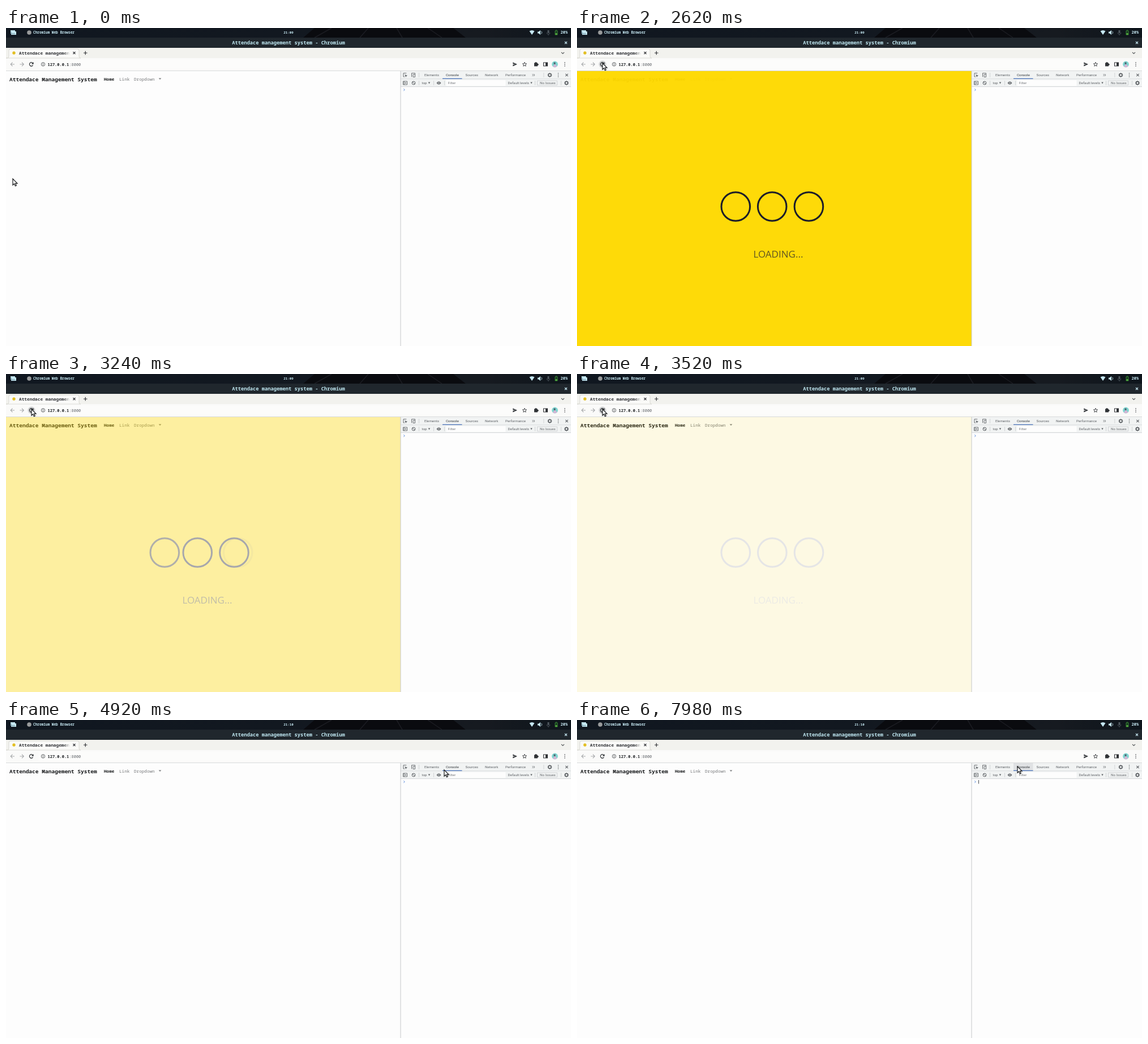
An HTML page with a canvas that plays this animation: 998x561 px, repeating every 8 s.

```html
<!DOCTYPE html>
<html lang="en">
<head>
<meta charset="utf-8">
<title>Attendace management system</title>
<style>
  html, body { margin: 0; width: 100%; height: 100%; overflow: hidden; background: #fdfdfd; }
  canvas { display: block; }
</style>
</head>
<body>
<canvas id="stage" width="998" height="561"></canvas>
<script>
const W = 998, H = 561, LOOP = 8000, SPLIT = 697;
const MONO = '"Noto Sans Mono", "DejaVu Sans Mono", monospace';
const SANS = 'Roboto, "Open Sans", sans-serif';
const ctx = document.getElementById('stage').getContext('2d');

const layer = document.createElement('canvas');
layer.width = SPLIT;
layer.height = H - 76;
const lctx = layer.getContext('2d');

// time, x, y of the pointer tip
const PATH = [
  [0, 12, 266], [250, 12, 266], [820, 27, 192], [1600, 45, 62],
  [4180, 45, 62], [4860, 774, 88], [5200, 774, 88], [5700, 776, 97],
  [6300, 777, 101], [6900, 778, 82], [8000, 778, 82]
];

const clamp = v => Math.max(0, Math.min(1, v));
const mix = (a, b, k) => a + (b - a) * k;
const smooth = k => k * k * (3 - 2 * k);
const between = (t, a, b) => t >= a && t < b;

// cubic-bezier(.25, .1, .25, 1)
function ease(x) {
  const curve = (a, b, s) => 3 * a * s * (1 - s) ** 2 + 3 * b * s * s * (1 - s) + s ** 3;
  let lo = 0, hi = 1;
  for (let i = 0; i < 24; i++) {
    const mid = (lo + hi) / 2;
    if (curve(.25, .25, mid) < x) lo = mid; else hi = mid;
  }
  return curve(.1, 1, lo);
}

function pointerAt(t) {
  const i = PATH.findIndex(p => p[0] > t);
  const [t0, x0, y0] = PATH[i - 1], [t1, x1, y1] = PATH[i];
  const k = smooth((t - t0) / (t1 - t0));
  return [mix(x0, x1, k), mix(y0, y1, k)];
}

function rect(x, y, w, h, color) {
  ctx.fillStyle = color;
  ctx.fillRect(x, y, w, h);
}

function text(s, x, y, size, color, family = MONO, weight = 400, align = 'left') {
  ctx.font = `${weight} ${size}px ${family}`;
  ctx.fillStyle = color;
  ctx.textAlign = align;
  ctx.fillText(s, x, y);
}

function dot(x, y, r, color) {
  ctx.fillStyle = color;
  ctx.beginPath();
  ctx.arc(x, y, r, 0, 7);
  ctx.fill();
}

function ring(x, y, r, color, width = 1, from = 0, to = 2 * Math.PI) {
  ctx.strokeStyle = color;
  ctx.lineWidth = width;
  ctx.beginPath();
  ctx.arc(x, y, r, from, to);
  ctx.stroke();
}

function shape(d, x, y, fill, stroke, width = 1) {
  const p = new Path2D(d);
  ctx.save();
  ctx.translate(x, y);
  if (fill) { ctx.fillStyle = fill; ctx.fill(p); }
  if (stroke) {
    ctx.strokeStyle = stroke;
    ctx.lineWidth = width;
    ctx.stroke(p);
  }
  ctx.restore();
}

function cross(x, y, r, color) {
  shape(`M${-r} ${-r}L${r} ${r}M${r} ${-r}L${-r} ${r}`, x, y, null, color, 1.1);
}

function kebab(x, y, color) {
  for (const d of [-3, 0, 3]) dot(x, y + d, .8, color);
}

function gear(x, y, color) {
  ring(x, y, 2.4, color, 1.5);
  for (let i = 0; i < 8; i++) {
    const a = i * Math.PI / 4;
    dot(x + 3.3 * Math.cos(a), y + 3.3 * Math.sin(a), .75, color);
  }
}

function drawSystemBar(t) {
  const sky = ctx.createLinearGradient(0, 0, W, 0);
  sky.addColorStop(0, '#101720');
  sky.addColorStop(.5, '#121820');
  sky.addColorStop(.85, '#161a20');
  sky.addColorStop(1, '#0e151c');
  rect(0, 0, W, 17, sky);
  shape('M545 0H790L812 17H525Z', 0, 0, '#0a0b0f');
  shape('M575 0L545 17M640 0L625 17M690 0L700 17M745 0L770 17', 0, 0, null, '#1b1c22', 1.5);

  const ink = '#c6e8f2';
  shape('M0 0H8V2H10V8H1V6H0Z', 8, 4, ink);
  shape('M1 2V6H8', 8, 4, null, '#4b7183', .8);
  dot(41, 8, 3.8, '#9a9c9d');
  text('Chromium Web Browser', 48, 10.2, 6.08, ink, MONO, 700);
  text(t < 4300 ? '21:09' : '21:10', 499, 10.2, 5.8, ink, MONO, 700, 'center');
  shape('M-4.5 -2.5Q0 -5.5 4.5 -2.5L0 4Z', 929, 8, ink);
  shape('M-4 -1.5H-2L1 -4V4L-2 1.5H-4Z', 943, 8, ink);
  ring(943.5, 8, 3, ink, .9, -1, 1);
  rect(956.5, 4, 3, 5, '#4e575e');
  ring(958, 8, 3, '#4e575e', .8, 0, Math.PI);
  rect(957.5, 11, 1, 2, '#4e575e');
  shape('M-2 -3H-1V-4H1V-3H2V4H-2Z', 972, 8, '#173a1e', '#3f9a3a', .8);
  rect(970.5, 9.5, 3, 2, '#6bd04a');
  text('20%', 979.5, 10.3, 7, ink, MONO, 700);

  rect(0, 17, W, 18, '#20272d');
  text('Attendace management system - Chromium', 499, 29, 8.75, '#bfe7f1', MONO, 700, 'center');
  cross(989, 26, 2, ink);
}

function drawTabs(t) {
  rect(0, 35, W, 18, '#f2f2ee');
  shape('M0 53H2Q5 53 5 50V40Q5 37 8 37H126Q129 37 129 40V50Q129 53 132 53Z', 0, 0, '#fafaf8', '#d3d3cd', .8);
  const loading = between(t, 1850, 2420);
  dot(14, 44, loading ? 1.4 : 2.7, '#e3bf23');
  text('Attendace managemen', 23, 46.7, 7.8, '#303236', MONO, 600);
  const fade = ctx.createLinearGradient(102, 0, 113, 0);
  fade.addColorStop(0, 'rgba(250,250,248,0)');
  fade.addColorStop(1, '#fafaf8');
  rect(102, 38, 11, 13, fade);
  cross(120.5, 44, 2, '#303236');
  shape('M-3.3 0H3.3M0 -3.3V3.3', 140.3, 44, null, '#303236', 1.2);
  shape('M-2.5 -1.2L0 1.3L2.5 -1.2', 983.5, 44, null, '#44474a', 1.1);
}

function drawToolbar(overReload) {
  rect(0, 53, W, 23, '#fafaf9');
  rect(0, 75, W, 1, '#d9dadb');
  const arrow = 'M3.5 0H-3M0 -3.3L-3.3 0L0 3.3';
  shape(arrow, 11.5, 64, null, '#a6a8aa', 1.1);
  ctx.save();
  ctx.translate(28, 64);
  ctx.scale(-1, 1);
  shape(arrow, 0, 0, null, '#a6a8aa', 1.1);
  ctx.restore();
  if (overReload) dot(45, 64, 6.5, '#d2d3d4');
  const ink = '#303336';
  ring(44.7, 64, 3.2, ink, 1.3, .5, 5.5);
  shape('M0 -3.8V0H-3.8Z', 48.7, 63.7, ink);

  rect(57, 56, 866, 16, '#fcfcfb');
  ring(65.5, 64, 3.2, '#505356', .9);
  rect(65, 63.4, 1, 2.4, '#505356');
  rect(65, 61.8, 1, 1, '#505356');
  text('127.0.0.1', 73.5, 66.6, 7, '#202326', MONO, 600);
  text(':8000', 111.3, 66.6, 7, '#65696d');
  shape('M-3.7 -3.4L4 0L-3.7 3.4V.8L1 0L-3.7 -.8Z', 899, 64, ink);
  let star = '';
  for (let i = 0; i < 10; i++) {
    const a = i * Math.PI / 5 - Math.PI / 2, r = i % 2 ? 1.7 : 3.8;
    star += (i ? 'L' : 'M') + r * Math.cos(a) + ' ' + r * Math.sin(a);
  }
  shape(star + 'Z', 916, 64.2, null, ink, .9);
  rect(933, 61.5, 6, 6, ink);
  dot(936, 61.5, 1.5, ink);
  dot(939.3, 64.5, 1.4, ink);
  shape('M-3.5 -3H3.5V3H-3.5Z', 953, 64, null, ink, 1.1);
  rect(953, 61, 3.5, 6, ink);
  dot(969.5, 64, 5.4, '#7fd5d0');
  shape('M-3.6 4A5.4 5.4 0 0 0 4 3.6L0 -1Z', 969.5, 64, '#d3b5d4');
  rect(967.5, 60.5, 3, 3.5, '#4c6670');
  kebab(987, 64, ink);
}

function drawPage() {
  rect(0, 76, W, H - 76, '#fdfdfd');
  text('Attendace Management System', 6, 94, 9.56, '#181a1c', MONO, 700);
  text('Home', 173, 93, 7.65, '#1d1f21', MONO, 700);
  text('Link', 200, 93, 7.65, '#77797b', MONO, 500);
  text('Dropdown', 226, 93, 7.65, '#77797b', MONO, 500);
  shape('M-2.4 -1H2.4L0 1.4Z', 272, 89.5, '#77797b');
}

function drawLoader(t) {
  if (!between(t, 2320, 3790)) return;
  const fade = .5 + Math.cos(Math.PI * clamp((t - 2460) / 1330)) / 2;
  const phase = ((t - 2699) / 880 + 1) % 1, k = ease(phase);
  const c = lctx;
  c.globalAlpha = 1;
  c.fillStyle = '#ffd900';
  c.fillRect(0, 0, SPLIT, H);
  c.strokeStyle = '#141523';
  c.lineWidth = 3;
  const step = 64.7;
  const circles = [[0, k], [k, 1], [1 + k, 1], [2, 1 - k]];
  for (const [slot, alpha] of circles) {
    c.globalAlpha = alpha;
    c.beginPath();
    c.arc(280.3 + slot * step, 239, 25.3, 0, 7);
    c.stroke();
  }
  c.globalAlpha = .7;
  c.fillStyle = '#141523';
  c.font = 'extra-condensed 17px "Open Sans", Roboto, sans-serif';
  c.textAlign = 'center';
  c.fillText('LOADING...', 355.5, 329);
  ctx.globalAlpha = fade;
  ctx.drawImage(layer, 0, 76);
  ctx.globalAlpha = 1;
}

function drawDevtools(t, overConsole) {
  const ink = '#5d6165', label = (s, x, y, color = ink) => text(s, x, y, 6.25, color, SANS);
  rect(SPLIT, 76, W - SPLIT, H - 76, '#fdfdfd');
  rect(SPLIT, 76, W - SPLIT, 28, '#f1f3f3');
  rect(SPLIT, 89.5, W - SPLIT, .7, '#d0d3d6');
  rect(SPLIT, 103, W - SPLIT, .8, '#d0d3d6');
  rect(SPLIT - .5, 76, 1, H - 76, '#c6c8ca');

  shape('M2 -3.3H-3.3V3H-1', 705.3, 83, null, ink, .9);
  shape('M-1 -1L4 1L1.8 1.8L1 4Z', 705.3, 83, ink);
  shape('M-2.5 3.3V-3.3H3.5V-1M0 -1H3.5V3.5H0Z', 719, 83, null, ink, .9);
  rect(729, 79, .8, 8, '#cbcdcf');
  if (overConsole) rect(771, 76, 34.5, 13, '#dfe1e3');
  label('Elements', 739, 85);
  label('Console', 777, 85, '#303438');
  label('Sources', 811.5, 85);
  label('Network', 846, 85);
  label('Performance', 882, 85);
  rect(771, 88.7, 34.5, 1.2, '#3f6bb5');
  shape('M-2 -2L0 0L-2 2M.5 -2L2.5 0L.5 2', 931.5, 83, null, ink, .8);
  rect(949.5, 79, .8, 8, '#cbcdcf');
  gear(960.5, 83, ink);
  kebab(975.5, 83, ink);
  cross(990.5, 83, 2.2, ink);

  shape('M-3.5 -3H3.5V3H-3.5ZM-1.7 -3V3', 705, 97, null, ink, .9);
  shape('M0 -1.5L2.3 0L0 1.5Z', 705, 97, ink);
  ring(720, 97, 2.9, ink, 1);
  shape('M-2 -2L2 2', 720, 97, null, ink, 1);
  rect(729, 93, .8, 8, '#cbcdcf');
  label('top', 734.5, 99);
  shape('M-1.7 -1.4H1.7L0 1.6Z', 747.5, 97, ink);
  rect(755, 93, .8, 8, '#cbcdcf');
  shape('M-4 0Q0 -5.5 4 0Q0 5.5 -4 0Z', 764.5, 97, ink);
  ring(764.5, 97, 1.4, '#f1f3f3', .7);
  rect(774, 93, .8, 8, '#cbcdcf');
  rect(777.5, 92, 105, 10, '#fdfdfd');
  label('Filter', 780.5, 99, '#797c80');
  label('Default levels', 886.5, 99);
  shape('M-1.7 -1.4H1.7L0 1.6Z', 928, 97, ink);
  rect(934, 93, .8, 8, '#cbcdcf');
  shape('M0 0H35V8H0Z', 938.5, 93, null, '#c9cccf', .8);
  label('No Issues', 943, 99);
  rect(980, 93, .8, 8, '#cbcdcf');
  gear(990, 97, ink);

  shape('M-1 -1.8L1 0L-1 1.8', 703.3, 109, null, '#4a7fd8', .9);
  if (t >= 6900 && Math.floor((t - 6900) / 500) % 2 === 0) rect(709, 106, .9, 6.5, '#33363a');
}

function drawPointer(x, y) {
  shape('M0 0V11.2L2.6 8.8L4.4 12.8L6.3 12L4.6 8.1H8Z', x, y, '#fff', '#17191b', 1.2);
}

function draw(t) {
  const [x, y] = pointerAt(t);
  drawPage();
  drawLoader(t);
  drawDevtools(t, between(x, 771, 806) && between(y, 76, 88));
  drawToolbar(Math.hypot(x - 45, y - 64) < 6.5);
  drawTabs(t);
  drawSystemBar(t);
  drawPointer(x, y);
}

const start = performance.now();
function tick() {
  draw((performance.now() - start) % LOOP);
  requestAnimationFrame(tick);
}
tick();
</script>
</body>
</html>
```
